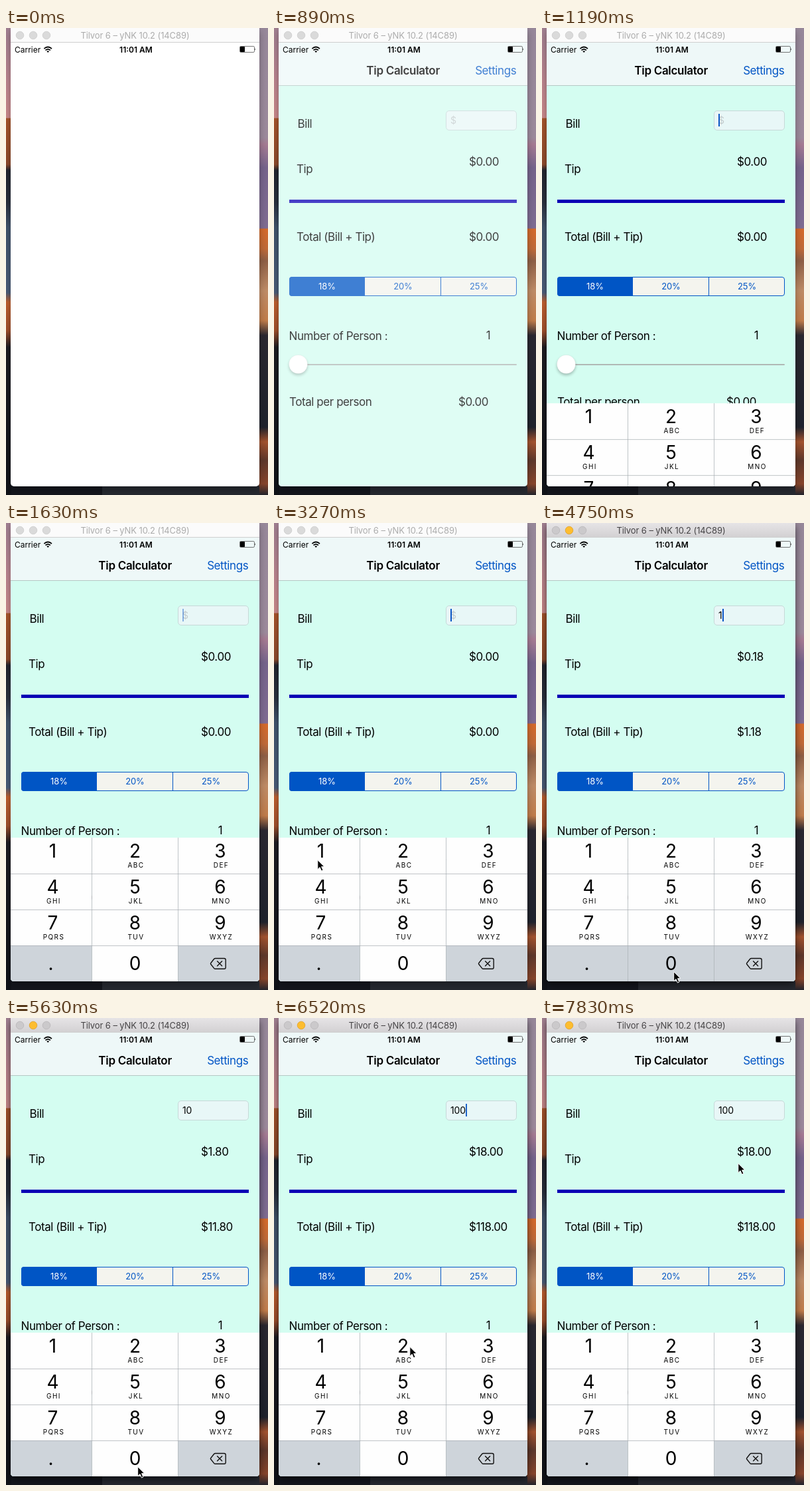
An HTML page that plays this animation: 395x702 px, repeating every 8000 ms.

```html
<!DOCTYPE html>
<html lang="en">
<head>
<meta charset="utf-8">
<title>Tip Calculator</title>
<style>
  html, body { margin: 0; width: 100%; height: 100%; overflow: hidden; background: #14161d; }
  svg { display: block; width: 100%; height: 100%; }
  text { font-family: Inter, "Open Sans", sans-serif; white-space: pre; }
  .label { font-size: 17px; letter-spacing: -0.43px; }
  .heading { font-size: 17px; font-weight: 600; letter-spacing: -0.3px; }
  .mid { text-anchor: middle; }
  .small { font-size: 13px; letter-spacing: -0.1px; }
  .field { font-size: 14px; letter-spacing: -0.15px; }
  .digit { font-size: 28px; text-anchor: middle; }
  .letters { font-size: 10px; letter-spacing: 1.4px; text-anchor: middle; }
</style>
</head>
<body>
<svg id="stage" viewBox="0 0 395 702">
  <defs id="defs">
    <clipPath id="frame"><rect x="7" y="-6" width="375" height="695" rx="5"/></clipPath>
    <clipPath id="screen"><path d="M7 22H382V684q0 5 -5 5H12q-5 0 -5 -5Z"/></clipPath>
    <linearGradient id="bar" x2="0" y2="1">
      <stop stop-color="#e6e4e6"/><stop offset="1" stop-color="#d2d0d2"/>
    </linearGradient>
    <filter id="blur" x="-20%" y="-20%" width="140%" height="140%"><feGaussianBlur stdDeviation="6"/></filter>
    <filter id="soft" x="-50%" y="-50%" width="200%" height="200%"><feGaussianBlur stdDeviation="2"/></filter>
  </defs>

  <rect width="395" height="702" fill="#14161d"/>
  <g id="wall"></g>
  <rect id="shadow" x="7" y="4" width="375" height="689" rx="5" filter="url(#blur)"/>

  <g clip-path="url(#frame)">
    <rect x="7" y="0" width="375" height="689" fill="#fff"/>
    <rect id="titlebar" x="7" y="0" width="375" height="22"/>
    <rect x="7" y="21" width="375" height="1" fill="#cfcfcf"/>
    <g id="lights"></g>
    <text id="title" class="small mid" x="194.5" y="16">Tilvor 6 – yNK 10.2 (14C89)</text>
  </g>

  <g clip-path="url(#screen)">
    <g id="app">
      <rect x="7" y="22" width="375" height="667" fill="#d4fdf1"/>
      <rect x="7" y="22" width="375" height="64" fill="#eef8f8"/>
      <rect x="7" y="86" width="375" height="1" fill="#b5c9c5"/>
      <text class="heading mid" x="194.6" y="70">Tip Calculator</text>
      <text class="label" x="365.2" y="70" text-anchor="end" fill="#0055c5">Settings</text>
      <rect x="259.5" y="124.5" width="106" height="29" rx="4.5" fill="#e8f7f7" stroke="#c6d9d8"/>
      <text id="bill" class="field" x="266" y="143.7"></text>
      <rect id="caret" y="129" width="2" height="19" fill="#0a55c5"/>
      <rect x="23" y="258" width="343" height="5" fill="#0a00b5"/>
      <rect x="23.5" y="374.5" width="342" height="28" rx="3.5" fill="#f4f4ee" stroke="#0055c5"/>
      <path d="M137 374H27q-4 0 -4 4v21q0 4 4 4H137Z" fill="#0055c5"/>
      <path d="M251.5 374V403" stroke="#0055c5"/>
      <rect x="24" y="505" width="342" height="2" rx="1" fill="#b0b8b5"/>
      <circle cx="36.5" cy="508" r="14" opacity=".25" filter="url(#soft)"/>
      <circle cx="36.5" cy="505.5" r="14" fill="#fff" stroke="#000" stroke-opacity=".08" stroke-width=".5"/>
    </g>
    <g id="keyboard"></g>
    <g id="status">
      <text x="13" y="36.5" font-size="12">Carrier</text>
      <g fill="none" stroke="#000" stroke-width="1.7">
        <path d="M57.4 31.2q5.8 -5.4 11.6 0"/><path d="M59.6 33.5q3.6 -3.2 7.2 0"/>
      </g>
      <path d="M61.3 35.1q1.9 -1.5 3.8 0L63.2 37Z"/>
      <text class="mid" x="196" y="36.5" font-size="12" font-weight="600">11:01 AM</text>
      <rect x="352.5" y="27.5" width="22" height="9" rx="1.6" fill="none" stroke="#555" stroke-width=".8"/>
      <rect x="353" y="28" width="7" height="8" rx=".8"/>
      <path d="M375.3 30.3q1.6 1.7 0 3.4Z"/>
    </g>
  </g>
  <path id="mouse" d="M0 0V14.2L3.3 11.1L5.7 16.6L8.2 15.5L5.8 10.2H10.2Z" fill="#000" stroke="#fff" stroke-linejoin="round"/>
</svg>

<script>
const LOOP = 8000, TICK = 148, LAST = 53;
const HEIGHT = 702;
const $ = id => document.getElementById(id);
const set = (el, attrs) => { for (const name in attrs) el.setAttribute(name, attrs[name]); };

function add(parent, tag, attrs, content = "") {
  const el = document.createElementNS("http://www.w3.org/2000/svg", tag);
  set(el, attrs);
  el.textContent = content;
  return parent.appendChild(el);
}

// Wallpaper: one soft vertical gradient per visible side, [y, colour]
function strip(id, x, width, stops) {
  const gradient = add($("defs"), "linearGradient", { id, x2: 0, y2: 1 });
  for (const [y, color] of stops)
    add(gradient, "stop", { offset: y / HEIGHT, "stop-color": color });
  add($("wall"), "rect", { x, width, height: HEIGHT, fill: `url(#${id})` });
}
strip("left", 0, 8, [
  [0, "#a07f91"], [80, "#bd8690"], [135, "#cb8a8c"], [136, "#a8552c"], [205, "#8d4a2c"],
  [214, "#22252f"], [262, "#2a303e"], [300, "#42546d"], [398, "#4b5d79"], [412, "#c0602f"],
  [455, "#a04f2c"], [480, "#1d1c22"], [702, "#101218"]
]);
strip("right", 381, 14, [
  [0, "#97889a"], [165, "#9d8a9c"], [175, "#a67b93"], [210, "#76648c"], [301, "#806c92"],
  [302, "#d56a2b"], [332, "#c06a38"], [350, "#8f6046"], [395, "#bf8c66"], [440, "#c07c4a"],
  [462, "#2b2830"], [600, "#20232c"], [622, "#a3532e"], [650, "#5e382b"], [685, "#87452b"], [702, "#22232b"]
]);
add($("wall"), "path", { d: "M145 689H382V702H145Z", fill: "#262930" });

const lights = [21, 41, 61].map(cx => add($("lights"), "circle", { cx, cy: 11, r: 5.8 }));

// Form labels
const label = (x, y, s, cls = "label", extra = {}) => add($("app"), "text", { x, y, class: cls, ...extra }, s);
label(35.5, 149.7, "Bill");
label(34, 217.7, "Tip");
label(34, 320.3, "Total (Bill + Tip)");
label(22.5, 468.7, "Number of Person :");
label(323, 468, "1", "label mid");
label(23, 567.7, "Total per person");
const tip = label(294, 206.5, ""), total = label(294, 320.2, ""), share = label(278, 567.7, "");
["18%", "20%", "25%"].forEach((s, i) =>
  label([80, 194.5, 309][i], 393.2, s, "small mid", { fill: i ? "#0055c5" : "#fff" }));

// Number pad
const pad = $("keyboard"), keys = {};
const EDGE = [7, 129.5, 259.5, 382], CENTER = [70.5, 194.5, 323], TOP = 473, ROW = 54;
const GREY = "#ced4da", WHITE = "#fefefe";
const CAPS = ["1", "2 ABC", "3 DEF", "4 GHI", "5 JKL", "6 MNO", "7 PQRS", "8 TUV", "9 WXYZ", ".", "0", ""];
CAPS.forEach((cap, i) => {
  const [digit, letters] = cap.split(" ");
  const col = i % 3, y = TOP + ROW * Math.floor(i / 3);
  keys[digit] = add(pad, "rect", {
    x: EDGE[col], y, width: EDGE[col + 1] - EDGE[col], height: ROW, fill: digit > 0 || digit === "0" ? WHITE : GREY
  });
  const x = digit === "." ? 67.5 : CENTER[col];
  add(pad, "text", { class: "digit", x, y: y + (i < 9 ? 30 : 37) }, digit);
  if (letters) add(pad, "text", { class: "letters", x: CENTER[col] + 1.5, y: y + 45 }, letters);
});
add(pad, "path", {
  d: "M7 527.5H382M7 581.5H382M7 635.5H382M129.5 473V689M259.5 473V689",
  stroke: "#a8adb2", "stroke-width": .7, fill: "none"
});
add(pad, "path", {
  d: "M315.5 654.5H329q2.2 0 2.2 2.2V668q0 2.2 -2.2 2.2H315.5q-1 0 -1.8 -.8L308.8 663.3q-.8 -.9 0 -1.8L313.7 655.3q.8 -.8 1.8 -.8ZM318.6 658.8l7 7m0 -7l-7 7",
  fill: "none", stroke: "#111", "stroke-width": 1.4, "stroke-linejoin": "round", "stroke-linecap": "round"
});

// Timeline in ticks
const BILLS = [[0, ""], [25, "1"], [33, "10"], [41, "100"]];
const PRESSES = [["1", 23, 25], ["0", 31, 33], ["0", 40, 41]];
const FOCUS_TIMES = [1060, 3610, 4884, 6068]; // caret restarts, ms
const PATH = [
  [15, 112, 622], [18, 65.8, 506.5], [24, 65.8, 506.5], [26, 200, 677], [27, 200, 677],
  [29, 198.7, 674.5], [41, 198.7, 674.5], [47, 211, 314], [LAST, 295.8, 218.5]
];

const clamp = v => Math.max(0, Math.min(1, v));
const latest = (list, test) => list.filter(test).pop();

function mouseAt(k) {
  const i = Math.max(1, PATH.findIndex(p => p[0] >= k));
  const [k0, x0, y0] = PATH[i - 1], [k1, x1, y1] = PATH[i];
  const p = clamp((k - k0) / (k1 - k0));
  return [x0 + (x1 - x0) * p, y0 + (y1 - y0) * p];
}

function caretOpacity(ms) {
  const start = latest(FOCUS_TIMES, s => s <= ms);
  if (start === undefined) return 0;
  const age = (ms - start) / 1000;
  if (age < .42) return 1;
  const phase = (age - .42) % 1;
  return phase < .53 ? clamp(1 - phase / .26) : clamp((phase - .53) / .15);
}

function drawWindow(active) {
  set($("titlebar"), { fill: active ? "url(#bar)" : "#fbfbfb" });
  set($("title"), { fill: active ? "#464446" : "#acacac" });
  set($("shadow"), { opacity: active ? .6 : .3 });
  lights.forEach((light, i) => {
    const yellow = active && i === 1;
    set(light, {
      fill: yellow ? "#fdbd2f" : active ? "#cbc9cb" : "#dadada",
      stroke: yellow ? "#e0a028" : active ? "#b9b7b9" : "#cccccc", "stroke-width": .8
    });
  });
}

function drawForm(k, ms) {
  const bill = latest(BILLS, b => b[0] <= k)[1], money = v => "$" + v.toFixed(2);
  const field = $("bill");
  field.textContent = bill || "$";
  set(field, { fill: bill ? "#000" : "#c2cacc" });
  tip.textContent = money(bill * .18);
  total.textContent = share.textContent = money(bill * 1.18);
  const width = bill ? field.getComputedTextLength() : 0;
  set($("caret"), { x: 266 + Math.round(width), opacity: caretOpacity(ms) });
  set($("app"), { opacity: k < 6 ? 0 : k < 7 ? .75 : 1 });
}

function drawKeyboard(k) {
  const rise = 1 - (1 - clamp((k - 7) / 4)) ** 3;
  set(pad, { transform: `translate(0 ${216 * (1 - rise)})` });
  for (const d of ["1", "0"])
    set(keys[d], { fill: PRESSES.some(([key, a, b]) => key === d && k >= a && k < b) ? GREY : WHITE });
}

function draw(t) {
  const k = Math.min(LAST, Math.floor((t + 14) / TICK));
  drawWindow(k >= 23);
  drawForm(k, k * TICK);
  drawKeyboard(k);
  const [x, y] = mouseAt(k);
  set($("mouse"), { transform: `translate(${x} ${y})`, visibility: k < PATH[0][0] ? "hidden" : "visible" });
}

const begin = performance.now();
function loop() {
  draw((performance.now() - begin) % LOOP);
  requestAnimationFrame(loop);
}
loop();
</script>
</body>
</html>
```
